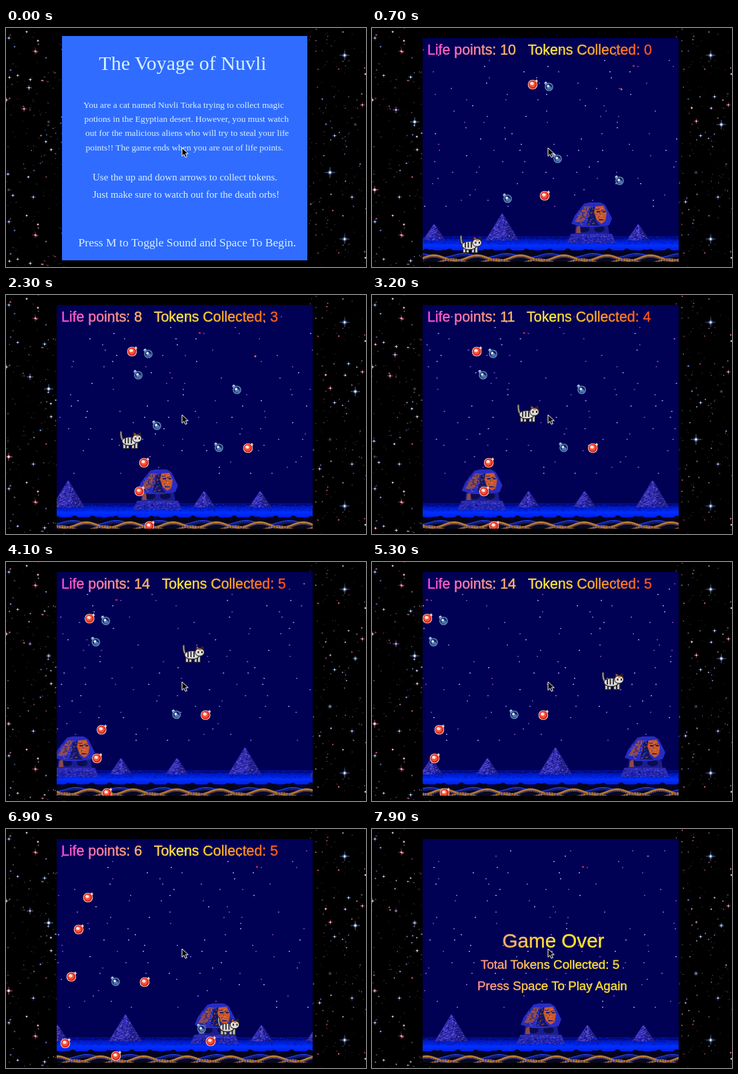
Write an HTML page with a canvas that moves like this. It is 540x359 px and loops after 8000 ms.

```html
<!DOCTYPE html>
<html lang="en">
<head>
<meta charset="utf-8">
<title>Desert cat game</title>
<style>
html, body { margin: 0; width: 100%; height: 100%; overflow: hidden; background: #000; }
canvas, svg { position: absolute; left: 0; top: 0; width: 540px; height: 359px; }
#intro { font-family: "Liberation Serif", "Times New Roman", serif; fill: #d9f1ff; }
#hud, #over { font-family: "Liberation Sans", Arial, sans-serif; stroke-width: .4px; }
#hud { font-size: 21.35px; fill: url(#hot); stroke: url(#hot); }
#over { font-size: 18.75px; fill: url(#warm); stroke: url(#warm); }
</style>
</head>
<body>
<canvas id="stage" width="540" height="359"></canvas>
<svg viewBox="0 0 540 359">
  <defs>
    <linearGradient id="hot" gradientUnits="userSpaceOnUse" x1="76" y1="0" x2="460" y2="0">
      <stop offset="0" stop-color="#f4d"/><stop offset=".5" stop-color="#fff02c"/><stop offset="1" stop-color="#ff2010"/>
    </linearGradient>
    <linearGradient id="warm" gradientUnits="userSpaceOnUse" x1="60" y1="0" x2="270" y2="0">
      <stop offset="0" stop-color="#f4d"/><stop offset="1" stop-color="#ffe22c"/>
    </linearGradient>
  </defs>
  <g id="intro">
    <rect x="84" y="12" width="368" height="337" fill="#306cff"/>
    <text x="265" y="63" font-size="30" text-anchor="middle">The Voyage of Nuvli</text>
    <g font-size="13.4">
      <text x="116" y="119.5">You are a cat named Nuvli Torka trying to collect magic</text>
      <text x="117.5" y="141">potions in the Egyptian desert. However, you must watch</text>
      <text x="119" y="162">out for the malicious aliens who will try to steal your life</text>
      <text x="119.5" y="183.5">points!! The game ends when you are out of life points.</text>
    </g>
    <g font-size="15">
      <text x="130" y="229">Use the up and down arrows to collect tokens.</text>
      <text x="130" y="254.5">Just make sure to watch out for the death orbs!</text>
    </g>
    <text x="108.5" y="328" font-size="17.6">Press M to Toggle Sound and Space To Begin.</text>
  </g>
  <text id="hud" x="83" y="39.5"></text>
  <g id="over">
    <text x="195.5" y="178" font-size="29.6">Game Over</text>
    <text x="163" y="209.5">Total Tokens Collected: 5</text>
    <text x="158" y="241.5">Press Space To Play Again</text>
  </g>
  <path d="M264 180v12.5l3-2.8 2 4.6 2.4-1-2-4.5h4z" fill="#000" stroke="#fff" stroke-width="1"/>
</svg>
<script>
const LOOP = 8000, STEP = 100, START = 300, END = 7200;
const WIDE = 390, SPACE_H = 276;
const BOX = { x: 76, y: 15, w: 384, h: 336 };
const $ = id => document.getElementById(id);
const g = $('stage').getContext('2d');

// Piecewise-linear value of column `col` in a list of [time, ...values]
function at(keys, t, col = 1) {
  let i = 1;
  while (i < keys.length - 1 && t >= keys[i][0]) i++;
  const a = keys[i - 1], b = keys[i];
  const k = Math.min(1, Math.max(0, (t - a[0]) / (b[0] - a[0])));
  return a[col] + (b[col] - a[col]) * k;
}
function seeded(s) {
  return () => (s = (s * 16807) % 2147483647) / 2147483647;
}
function poly(c, color, ...p) {
  c.fillStyle = color;
  c.beginPath();
  for (let i = 0; i < p.length; i += 2) c.lineTo(p[i], p[i + 1]);
  c.fill();
}
function dot(c, color, x, y, r, ry = r) {
  c.fillStyle = color;
  c.beginPath();
  c.ellipse(x, y, r, ry, 0, 0, 7);
  c.fill();
}
function rect(c, color, x, y, w, h) {
  c.fillStyle = color;
  c.fillRect(x, y, w, h);
}
// Random flecks of alternating colours inside a box
function fleck(c, rnd, n, colors, x, y, w, h) {
  for (let i = 0; i < n; i++)
    rect(c, colors[i % colors.length], x + rnd() * w, y + rnd() * h, 2, 1);
}

const scroll = [[0, -45], [700, 0], [2300, 102], [5300, 310], [7900, 466]];
const catPath = [[900, 148, 325], [1700, 187, 170], [2300, 187, 218], [4100, 281, 138],
  [5300, 361, 179], [6000, 374, 232], [7200, 320, 318]];
const damage = [[1700, 0], [2300, 11], [6500, 11], [7200, 25]];
const pickups = [1300, 1500, 1700, 2700, 3900];

// Places are those at 700 ms; a third value is the pickup that removes the potion
const waves = [
  { from: 0, orbs: [[241, 85], [259, 252]],
    potions: [[265, 88], [278, 196, 3], [371, 229], [203, 256, 0]] },
  { from: 1500, orbs: [[415, 230], [252, 295], [267, 347]],
    potions: [[250, 120], [398, 142, 4]] },
  { from: 5600, orbs: [[330, 103], [316, 151], [305, 222], [296, 322], [372, 341], [514, 319]],
    potions: [[500, 300]] }
];

function pyramid(c, rnd, x, top, half) {
  poly(c, '#352fb4', x, top, x + half, 319, x - half, 319);
  poly(c, '#231f8c', x + 1, top, x + half, 319, x + half * .3, 319);
  for (let y = top + 2; y < 319; y++) {
    const w = half * (y - top) / (319 - top);
    fleck(c, rnd, w / 3, ['#5d4ee0', '#14146c'], x - w, y, 2 * w - 2, 0);
  }
}

function sphinx(c, rnd, x) {
  poly(c, '#2c2ab4', x - 31, 309, x + 30, 309, x + 36, 323, x - 38, 323);
  fleck(c, rnd, 120, ['#5a4fd8', '#17176e'], x - 33, 310, 64, 13);
  poly(c, '#1a1d90', x - 24, 294, x + 23, 292, x + 26, 309, x - 26, 309);
  dot(c, '#0b0c4c', x - 12, 302, 8, 5);
  dot(c, '#0b0c4c', x + 11, 302, 8, 5);
  poly(c, '#8d4a48', x - 23, 299, x - 18, 296, x - 17, 308, x - 24, 308);
  poly(c, '#262cc4', x - 12, 264, x - 4, 262, x + 13, 262, x + 20, 266, x + 30, 286,
    x + 26, 296, x + 8, 299, x - 14, 299, x - 31, 294, x - 26, 282);
  poly(c, '#8c4b52', x - 11, 268, x - 3, 268, x - 13, 291, x - 26, 291);
  poly(c, '#15165f', x - 2, 270, x + 4, 268, x + 6, 290, x + 12, 297, x - 8, 296);
  fleck(c, rnd, 90, ['#3a40e0', '#c4652f', '#15166a'], x - 22, 268, 24, 27);
  poly(c, '#c9582a', x + 5, 268, x + 17, 267, x + 22, 278, x + 20, 290, x + 14, 294, x + 7, 288, x + 3, 277);
  fleck(c, rnd, 26, ['#30248c', '#e8803a'], x + 5, 270, 14, 20);
  rect(c, '#17186c', x + 7, 275, 5, 2);
  rect(c, '#17186c', x + 16, 275, 4, 2);
  rect(c, '#45206a', x + 10, 287, 7, 2);
}

function dunes(c) {
  const wave = (x, n, shift = 0) => Math.sin(x / WIDE * 2 * Math.PI * n + shift);
  for (let x = 0; x < WIDE; x++) {
    const hill = 334 - 2 * wave(x, 13) - wave(x, 31);
    const back = 341 - 3 * wave(x, 6, 2);
    const gold = 345 - 4 * wave(x, 6);
    const front = 349 - 3 * wave(x, 6, 3.6);
    rect(c, '#04041c', x, hill, 1, 25);
    rect(c, '#2036d0', x, back, 1, 2);
    rect(c, '#121a6c', x, back + 2, 1, 3);
    rect(c, '#b87a34', x, gold - 1, 1, 3);
    rect(c, x % 3 ? '#6b4434' : '#23286c', x, gold + 2, 1, 2);
    rect(c, '#070822', x, gold + 4, 1, 9);
    rect(c, x % 4 ? '#a66c34' : '#3038a0', x, front, 1, 3);
  }
}

function makeDesert() {
  const tile = document.createElement('canvas');
  tile.width = WIDE;
  tile.height = 359;
  const c = tile.getContext('2d'), rnd = seeded(73);
  rect(c, '#000055', 0, 0, WIDE, 359);
  for (let y = 32; y < 270; y += 8.4)
    for (let x = rnd() * 100; x < WIDE; x += 25 + rnd() * 150)
      rect(c, ['#7a6cf0', '#7a40d0', '#9c98ff'][rnd() * 3 | 0], x | 0, y | 0, 2, 1.5);
  rect(c, '#e02448', 315, 56, 3, 2);
  for (let y = 313; y < 320; y += 2) rect(c, '#0014b0', 0, y, WIDE, 1);
  const haze = c.createLinearGradient(0, 317, 0, 333);
  haze.addColorStop(0, '#0014b8');
  haze.addColorStop(.6, '#0030ff');
  haze.addColorStop(1, '#0020e8');
  rect(c, haze, 0, 317, WIDE, 17);
  pyramid(c, rnd, 17, 294, 17);
  pyramid(c, rnd, 119, 278, 25);
  pyramid(c, rnd, 323, 294, 17);
  sphinx(c, rnd, 254);
  fleck(c, rnd, 500, ['#0020cc', '#0012a0'], 0, 314, WIDE, 10);
  dunes(c);
  return tile;
}

// Outer space: two margins of stars, repeating downwards
const rnd = seeded(421);
const hues = ['#a88cff', '#ff7a98', '#7fb0ff', '#e0b8f0'];
const margin = () => (rnd() * 172 + 455) % 540;
const dust = Array.from({ length: 300 }, (_, i) => ({
  x: margin(), y: rnd() * SPACE_H, r: .45 + rnd() ** 4 * .9, p: rnd() * 6.28, hue: hues[i % 4]
}));
// sync: 0 steady, 1 bright at loop start, -1 bright half a turn later
const star = (x, y, arm, hue, sync = 0) => ({ x, y, arm, hue, sync });
const flares = [
  star(508, 41, 8, hues[2]), star(64, 141, 7, hues[2], -1), star(524, 145, 7, hues[2], -1),
  star(486, 217, 8, hues[2], 1), star(4, 243, 6, hues[1], -1), star(44, 35, 5, hues[1]),
  star(41, 254, 4, hues[0]), star(519, 254, 4, hues[0]), star(36, 123, 5, hues[0], -1)
];
for (let i = 0; i < 26; i++) flares.push(star(margin(), rnd() * SPACE_H, 2 + rnd() * 2, hues[i % 4], i % 3 - 1));

function space(t) {
  rect(g, '#000', 0, 0, 540, 359);
  const turn = t / 1500 * 2 * Math.PI;
  for (let top = 0; top < 359; top += SPACE_H) {
    for (const s of dust) {
      g.globalAlpha = .6 + .25 * Math.cos(turn + s.p);
      dot(g, s.hue, s.x, s.y + top, s.r);
    }
    for (const { x, y: y0, arm, hue, sync } of flares) {
      const y = y0 + top;
      const k = sync ? Math.min(1, Math.max(.2, .5 + .9 * sync * Math.cos(turn))) : .9;
      g.globalAlpha = k * .35;
      dot(g, hue, x, y, arm * .45);
      g.globalAlpha = k * .8;
      rect(g, hue, x - arm * k, y - .4, 2 * arm * k, .8);
      rect(g, hue, x - .4, y - arm * k, .8, 2 * arm * k);
      g.globalAlpha = k;
      dot(g, '#fff', x, y, arm > 5 ? 1.7 : 1);
    }
  }
  g.globalAlpha = 1;
}

function orb(x, y) {
  poly(g, '#f0c8b4', x + 3, y - 5, x + 6, y - 8, x + 8, y - 5, x + 6, y - 3);
  dot(g, '#ffd8cc', x, y, 7.3);
  dot(g, '#d8261a', x, y, 6.4);
  dot(g, '#f6503a', x - .5, y - .5, 4.8);
  dot(g, '#ffd8c8', x - 1, y - 1.5, 2.8, 2.3);
  dot(g, '#fff', x - 1.5, y - 2, 1.4);
}

function potion(x, y) {
  poly(g, '#6a8fc2', x - 7, y - 5, x - 4, y - 8, x + 1, y - 2, x - 3, y + 1);
  rect(g, '#a9c8e8', x - 6, y - 7, 3, 2);
  dot(g, '#6f92c8', x + .5, y + .5, 6.3);
  dot(g, '#14255c', x + .5, y + .5, 5);
  dot(g, '#4a78b4', x + 1, y + 2, 3.6, 2.6);
  dot(g, '#dceeff', x - .8, y - .8, 1.9);
}

function cat(x, y) {
  const ink = '#24222c', fur = '#dedcd6';
  g.save();
  g.translate(x, y);
  g.lineCap = 'round';
  for (const [w, color] of [[4, ink], [1.8, '#a8a5a2']]) {
    g.lineWidth = w;
    g.strokeStyle = color;
    g.beginPath();
    g.moveTo(-11, 2);
    g.quadraticCurveTo(-15, -4, -14.5, -12);
    g.stroke();
  }
  for (const lx of [-11, -6, 2, 7]) {
    rect(g, ink, lx - 1, 4, 5, 9.5);
    rect(g, '#c8c5c0', lx, 4, 3, 8);
  }
  dot(g, ink, -2, 2, 11.5, 6.7);
  dot(g, fur, -2, 1.6, 10.5, 5.7);
  for (const sx of [-9, -4.5, 0]) rect(g, '#35323c', sx, -3.5, 2, 8.5);
  poly(g, ink, 3, -5, 3.5, -12.5, 9, -9, 15, -12, 17, -4);
  poly(g, '#d9653a', 5, -7, 5.5, -11, 9, -8);
  dot(g, ink, 9.5, -2.5, 7.3, 6.3);
  dot(g, fur, 9.5, -2.5, 6.3, 5.3);
  rect(g, '#bd6a4c', 8, -8, 4, 2.5);
  rect(g, ink, 6.5, -4, 2, 3);
  rect(g, ink, 12, -4, 2, 3);
  g.restore();
}

function drawAll(list, paint, t, shift) {
  for (const [x, y, eaten] of list)
    if (x - shift > 82 && !(t >= pickups[eaten])) paint(x - shift, y);
}

function play(t, moved) {
  if (t < 2600) dot(g, '#e87830', 374, 92, 1.5);
  for (const { from, orbs, potions } of waves) {
    if (t < from) continue;
    drawAll(orbs, orb, t, moved * .51);
    drawAll(potions, potion, t, moved * .51);
  }
  cat(at(catPath, t), at(catPath, t, 2));
  const tokens = pickups.filter(p => t >= p).length;
  const life = 10 + 3 * tokens - Math.round(at(damage, t));
  $('hud').textContent = `Life points: ${life}\u00a0\u00a0\u00a0Tokens Collected: ${tokens}`;
}

const desert = makeDesert();
function game(t) {
  const moved = at(scroll, t);
  const left = BOX.x - (moved + WIDE) % WIDE;
  g.save();
  g.beginPath();
  g.rect(BOX.x, BOX.y, BOX.w, BOX.h);
  g.clip();
  g.drawImage(desert, left, 0);
  g.drawImage(desert, left + WIDE, 0);
  if (t < END) play(t, moved);
  g.restore();
}

function show(id, on) {
  $(id).style.display = on ? '' : 'none';
}

function frame() {
  const t = Math.floor(performance.now() % LOOP / STEP) * STEP;
  space(t);
  if (t >= START) game(t);
  show('intro', t < START);
  show('hud', t >= START && t < END);
  show('over', t >= END);
  requestAnimationFrame(frame);
}
frame();
</script>
</body>
</html>
```
